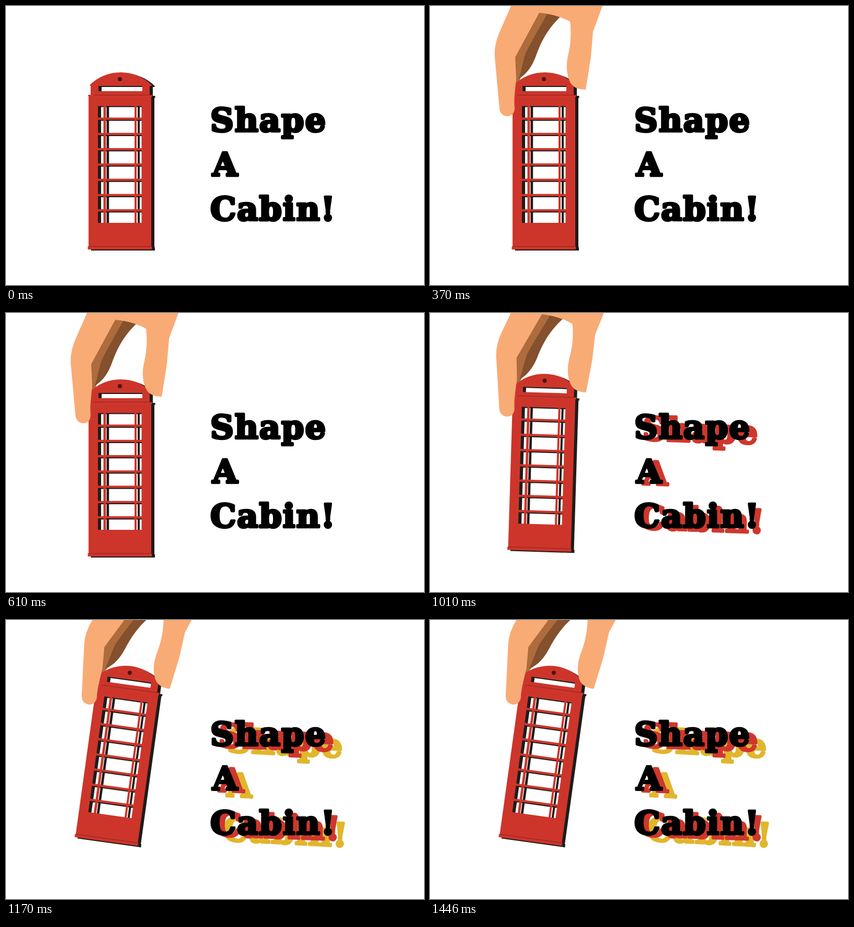
An HTML page for the animation above (1.63 s loop, 800 by 534 pixels).

```html
<!DOCTYPE html>
<html lang="en">
<head>
<meta charset="utf-8">
<title>Shape A Cabin!</title>
<style>
  html, body { margin: 0; width: 100%; height: 100%; overflow: hidden; background: #fff; }
  svg { display: block; width: 100%; height: 100%; }
  #words { font: bold 62px "DejaVu Serif", serif; letter-spacing: 2px; stroke-width: 4.5; stroke-linejoin: round; }
</style>
</head>
<body>
<svg viewBox="0 0 800 534">
  <defs>
    <g id="frame">
      <path fill-rule="evenodd" d="M160 151.500A84.500 84.500 0 0 1 279 151.500L278 153H275V170H279.500V174H278V460H279V466H156.500V460.500H158V172H157V170H162V153Z
        M177 153V163H261V153ZM176 191.500V415H259.500V191.500Z"/>
      <path id="bars"/>
    </g>
    <g id="words">
      <text x="391" y="240">Shape</text>
      <text x="395" y="325">A</text>
      <text x="391" y="410">Cabin!</text>
    </g>
  </defs>

  <g id="scene">
    <g class="hand">
      <path fill="#ae6c3d" d="M205 8L230 14L200 80L172 141L163 155L160 98Z"/>
      <path fill="#84502d" d="M226 12L250 20C224 45 212 70 203 95C196 114 186 130 170 139C176 122 177 108 183 90C196 64 212 38 226 12Z"/>
    </g>
    <use href="#frame" x="6" y="2" fill="#1d1d1b"/>
    <use href="#frame" fill="#cd352b"/>
    <path d="M168 170.500H280M157 460.300H279" stroke="#7d201a" stroke-width=".8"/>
    <circle cx="218" cy="140" r="4" fill="#4a1512"/>
    <path class="hand" fill="#f9ab76" d="M160 -11L155 0L133 50Q122 76 124 98L133 197C134 206 141 211 148 211C156 211 162 205 162 196C160 176 164 154 165 138L163 98L209 13Q243 16 268 30C271 56 269 75 264 96C259 119 263 139 271 150Q279 160 298 160L308 97L312 49L330 0L334 -11Z"/>
  </g>

  <use id="gold" href="#words" fill="#e0b62d" stroke="#e0b62d" transform="translate(27 15) rotate(2.9 450 327)"/>
  <use id="red" href="#words" fill="#d0372c" stroke="#d0372c" transform="translate(12 5) rotate(2 450 327)"/>
  <use href="#words" fill="#000" stroke="#000"/>
</svg>
<script>
  const LOOP = 1630;
  const STEPS = [370, 770, 1170];
  // Where the booth's lower right corner lands, and its tilt, in each pose.
  const PIVOT = [285.5, 468];
  const POSES = [[285.5, 468, 0], [285.5, 468, 0], [276.8, 459.3, 1.75], [258.7, 435.2, 7.9]];

  const $ = id => document.getElementById(id);
  const show = (el, on) => el.setAttribute("visibility", on ? "visible" : "hidden");
  const hands = document.querySelectorAll(".hand");

  let bars = "M186.500 191H191.200V416H186.500ZM246 191H250V416H246Z";
  for (let i = 0; i < 7; i++) {
    bars += `M175 ${213.4 + i * 29.25}h85v4.300h-85Z`;
  }
  $("bars").setAttribute("d", bars);

  function draw(ms) {
    const t = ms % LOOP;
    const step = STEPS.filter(s => t >= s).length;
    const [x, y, tilt] = POSES[step];
    $("scene").setAttribute("transform",
      `translate(${x} ${y}) rotate(${tilt}) translate(${-PIVOT[0]} ${-PIVOT[1]})`);
    hands.forEach(h => show(h, step > 0));
    show($("red"), step > 1);
    show($("gold"), step > 2);
  }

  const start = performance.now();
  function tick() {
    draw(performance.now() - start);
    requestAnimationFrame(tick);
  }
  tick();
</script>
</body>
</html>
```
